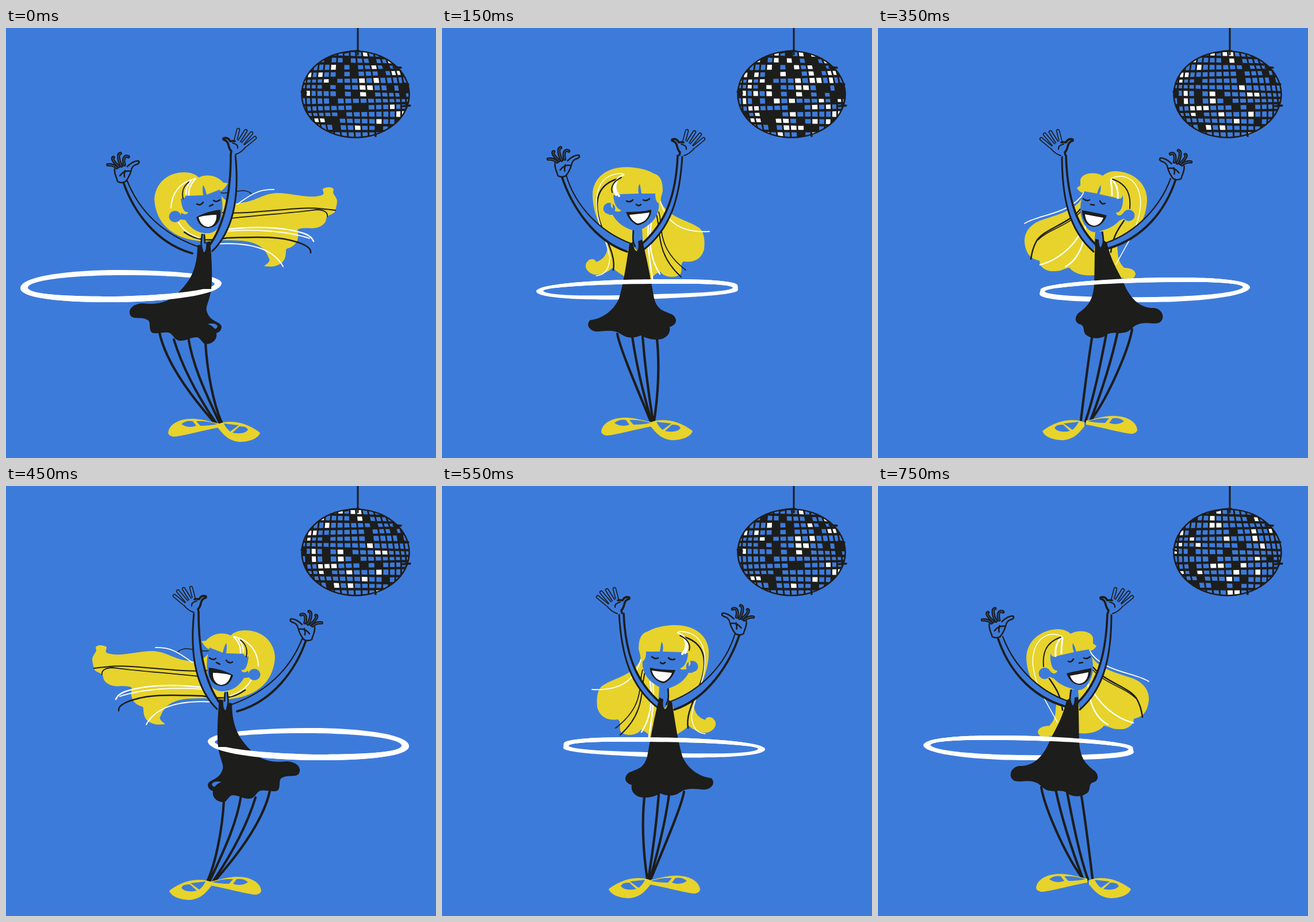
An HTML page that plays this animation: 748 by 748 pixels, repeating every 850 ms.

```html
<!DOCTYPE html>
<html lang="en">
<head>
<meta charset="utf-8">
<title>Hula hoop</title>
<style>
html, body { margin: 0; width: 100%; height: 100%; overflow: hidden; background: #3d7bdb; }
svg { display: block; width: 100vw; height: 100vh; }
path, ellipse { fill: none; stroke-linecap: round; stroke-linejoin: round; }
.k { stroke: #1d1d1b; }
.w { stroke: #fff; }
.b { stroke: #3d7bdb; }
.K { fill: #1d1d1b; }
.W { fill: #fff; }
.B { fill: #3d7bdb; }
.Y { fill: #e7d32b; }
.hoop { fill: #fff; fill-rule: evenodd; }
#girl, #girl > g, #ball > g { animation: 850ms step-end infinite; }
#girl { animation-name: flip; }
#girl > g, #ball > g { visibility: hidden; }
#girl > #far { animation-name: far; }
#girl > #mid { animation-name: mid; }
#girl > #near { animation-name: near; }
#ball > #tiles0 { animation-name: tiles0; }
#ball > #tiles1 { animation-name: tiles1; }
#ball > #tiles2 { animation-name: tiles2; }
#ball > #tiles3 { animation-name: tiles3; }
#ball > #grid { visibility: visible; animation: none; }
@keyframes flip {
  0%, 76.47% { transform: none; }
  29.41% { transform: translateX(726px) scaleX(-1); }
}
@keyframes far {
  0%, 52.94% { visibility: visible; }
  5.88%, 58.82% { visibility: hidden; }
}
@keyframes mid {
  0%, 17.64%, 52.94%, 64.7% { visibility: hidden; }
  5.88%, 41.17%, 58.82%, 88.23% { visibility: visible; }
}
@keyframes near {
  0%, 41.17%, 88.23% { visibility: hidden; }
  17.64%, 64.7% { visibility: visible; }
}
@keyframes tiles0 {
  0%, 64.7% { visibility: visible; }
  5.88%, 88.23% { visibility: hidden; }
}
@keyframes tiles1 {
  0%, 41.17% { visibility: hidden; }
  17.64% { visibility: visible; }
}
@keyframes tiles2 {
  0%, 64.7% { visibility: hidden; }
  41.17% { visibility: visible; }
}
@keyframes tiles3 {
  0%, 17.64% { visibility: hidden; }
  5.88%, 88.23% { visibility: visible; }
}
</style>
</head>
<body>
<svg viewBox="0 0 748 748">
  <defs>
    <clipPath id="disc"><ellipse cx="608" cy="115.500" rx="93.500" ry="75"/></clipPath>
    <clipPath id="top"><path d="M0 0H748V452H0Z"/></clipPath>
    <clipPath id="bottom"><path d="M0 454H748V748H0Z"/></clipPath>
  </defs>
  <g id="ball"></g>
  <g id="girl"></g>
</svg>
<script>
const path = (cls, d, width = 0) => `<path class="${cls}" d="${d}" stroke-width="${width}"/>`;
const at = ([x, y], art) => `<g transform="translate(${x} ${y})">${art}</g>`;
const strands = (cls, list) => list.map(([w, d]) => path(cls, d, w)).join('');
const finger = (d, outer, inner) => path('k', d, outer) + path('b', d, inner);

// Two cubic edges, each [x0,y0 ... x3,y3] from wrist to shoulder
function arm(outer, inner, wOuter, wInner) {
  const [a, b, c, d, e, f, g, h] = inner;
  const curve = p => `M${p.slice(0, 2)}C${p.slice(2)}`;
  return path('B', `${curve(outer)}L${g} ${h}C${e} ${f} ${c} ${d} ${a} ${b}Z`) +
    path('k', curve(outer), wOuter) + path('k', curve(inner), wInner);
}

const handL =
  path('B', 'M190 244L207 236L219 246L208 268L196 268Z') +
  ['M193 243Q186 237 177 238', 'M196 241C187 233 183 226 187 225',
   'M201 240C195 230 194 219 199 218', 'M206 238C203 228 206 220 213 224']
    .map(d => finger(d, 5.6, .9)).join('') +
  path('k B', 'M211 241Q221 231 230 231Q235 235 225 238Q219 241 218 247C216 255 212 262 208 267', 2.5) +
  path('k', 'M189 245C188 256 194 262 194 267Q201 271 208 267M198 257Q205 247 216 249M207 248Q205 254 206 259', 2.5);

const handR =
  ['M399 196L404 177', 'M405 198L417 179', 'M411 202L427 183', 'M415 206L433 191']
    .map(d => finger(d, 6.5, 3.2)).join('') +
  path('B', 'M389 197L401 194L419 207L409 217L398 222L391 218Z') +
  path('k', 'M378 192Q386 189 390 197Q395 196 398 197M378 194C390 197 385 209 392 214L391 219', 3.6) +
  path('k', 'M417 207Q409 217 399 220M394 200Q404 202 403 209', 2);

const shoeL = path('Y', 'M282 704C284 687 306 678 330 680C350 682 358 686 371 688L371 695C345 699 304 711 291 711Q282 709 282 704Z') +
  path('B', 'M305 689Q314 682 325 684L331 692Q316 697 305 689Z') +
  path('B', 'M331 684Q348 683 368 689Q354 692 338 692Z');
const shoeR = path('Y', 'M369 689C385 682 415 683 442 704C438 716 420 720 406 720C385 718 376 704 369 696Z') +
  path('B', 'M379 688L405 691L390 702Q383 697 379 688Z') +
  path('B', 'M394 704L406 693Q418 692 421 699Q414 708 394 704Z');

const poses = {
  far: {
    hair: 'M258 298C260 268 283 251 310 251C322 251 331 255 335 260C350 253 368 257 378 269L386 270C380 280 375 284 371 284C376 300 392 308 410 304C435 301 445 289 470 287C500 287 525 298 549 291C556 288 550 284 551 280C560 275 570 277 570 282C566 289 576 293 576 302C575 312 573 316 572 320C566 326 558 325 557 332C556 344 540 350 527 348C518 348 508 348 507 352C511 365 506 380 488 384C486 388 488 395 484 403C478 414 462 417 449 414C456 409 461 405 457 400C452 385 440 373 410 370C380 368 360 370 345 371C310 370 262 355 258 298Z',
    dark: [[2, 'M375 321C430 325 500 310 545 314Q565 316 573 317'], [1.8, 'M375 333C430 326 500 322 540 316C555 316 560 322 559 328'],
      [2.5, 'M310 355C330 369 350 372 385 365C430 364 470 361 505 372C525 378 531 384 530 391'],
      [1.4, 'M370 286C385 290 400 282 415 283Q425 285 427 289']],
    light: [[1.8, 'M402 307C425 290 440 280 466 281'], [2.5, 'M372 352C420 345 480 344 520 358Q532 363 535 371'],
      [1.8, 'M378 354C430 349 490 353 528 366'], [2, 'M350 377C400 372 460 375 482 415']],
    face: 'M304 297L310 296L313 292L343 291Q341 278 343 273Q347 280 349 290L372 281C376 295 379 312 374 335C371 350 362 357 350 357C332 357 320 347 312 334L303 333L305 321C312 327 316 323 317 320C309 322 306 312 304 297Z',
    ear: [294, 328],
    locks: [[2, 'M330 262C300 268 288 290 287 313M300 338C308 352 320 360 336 365'], [2.5, 'M329 263Q317 276 318 290M322 266Q313 276 313 289']],
    lockDark: 'M318 268C307 276 306 288 308 297',
    mouth: 'M331 329C345 321 358 318 373 316C375 328 370 348 350 348C340 347 334 340 331 329Z',
    teeth: 'M335 329C346 326 356 325 366 325C367 337 360 346 351 346C342 345 337 338 335 329Z',
    eyes: 'M332 306Q338 310 343 303M361 300Q366 304 372 299M354 310L360 307',
    neck: 'M341 358L346 358L348 388L344 391L339 382Z',
    neckLine: 'M341 359C340 370 338 377 342 388M345 360L346 374',
    armL: [[204, 268, 222, 320, 262, 375, 324, 392], [210, 264, 232, 320, 275, 360, 336, 381]],
    armR: [[399, 221, 406, 290, 398, 350, 359, 388], [391, 220, 391, 290, 380, 342, 354, 378]],
    dress: 'M333 378L338 377Q341 390 345 390Q349 386 348 373L355 371C358 400 360 440 356 460C352 480 346 486 350 495C356 512 374 510 375 520C374 530 366 530 366 531C368 541 360 550 347 550C342 549 339 540 333 538C322 537 315 544 303 544C293 544 290 531 283 530C275 528 262 533 254 530C248 525 252 515 248 509C238 501 225 508 217 501C210 490 222 479 238 479C262 482 285 477 300 460C320 440 333 420 333 378Z',
    gap: 'M351 515Q363 512 368 518Q367 524 363 523Q358 517 351 515Z',
    legs: 'M267 530C280 590 335 655 362 686M292 542C310 600 340 650 366 688M317 538C325 590 350 640 372 688M347 548C350 600 362 660 377 690',
    hoop: 'M25 452C27 429 130 420 205 421C290 422 370 428 375 443C377 462 300 476 180 477C90 477 24 469 25 452ZM38 452C40 464 110 467 190 467C290 465 362 455 363 445C358 434 280 430 205 430C120 430 38 438 38 452Z',
    front: 'bottom', hands: [[0, 0], [0, 0]], shoes: [[0, 0], [0, 0]],
  },
  mid: {
    hair: 'M258 300C258 268 285 250 312 249C325 249 332 254 335 257C350 249 371 252 374 264L374 274L380 278C376 286 370 287 366 287C378 315 405 322 435 332C465 340 475 360 470 380C465 400 455 402 445 405C445 415 435 424 420 423C408 424 400 417 393 417C385 428 365 432 350 430L300 435C290 438 280 438 278 428C280 418 290 418 298 417C310 405 308 395 310 380C290 370 260 345 258 300Z',
    dark: [[2.5, 'M374 315C395 342 440 350 451 372Q458 385 460 402'], [1.6, 'M372 318C395 345 430 350 448 369'], [2.5, 'M298 335C310 352 318 365 321 390']],
    light: [[1.5, 'M320 261C285 248 265 280 270 315C275 350 290 370 312 411'], [2.5, 'M366 330C362 365 375 402 400 415'],
      [2.5, 'M371 352C385 378 410 403 444 412'], [1.8, 'M367 285C390 325 445 323 471 340']],
    face: 'M300 291Q302 297 306 297L341 289Q337 281 339 273Q343 280 345 288L367 284C374 300 376 315 372 330C366 348 358 355 348 355C330 352 315 345 306 335L299 332L300 322C305 329 311 326 312 321C302 322 299 305 300 291Z',
    ear: [290, 326],
    locks: [[3, 'M319 263Q307 276 309 296M321 264Q319 278 319 291']],
    lockDark: 'M318 263C291 272 286 292 288 314',
    mouth: 'M328 326C342 322 356 320 371 317C371 330 366 345 350 346C340 345 332 338 328 326Z',
    teeth: 'M334 330C346 328 356 326 366 324C365 335 360 343 350 344C342 343 337 338 334 330Z',
    eyes: 'M331 305Q336 308 340 301M358 299Q363 302 369 297M350 308L356 307',
    neck: 'M334 354L348 354L350 378L338 385L332 378Z',
    neckLine: 'M336 355C334 366 332 374 338 383',
    armL: [[208, 263, 225, 315, 262, 365, 327, 384], [217, 262, 235, 310, 275, 355, 330, 374]],
    armR: [[406, 222, 406, 290, 396, 350, 351, 389], [399, 222, 397, 285, 385, 340, 348, 376]],
    dress: 'M328 373L334 369Q335 382 338 383Q342 380 342 368L348 367C350 400 349 440 351 455C354 475 362 484 375 494C384 500 385 512 376 515C366 517 370 525 366 532C358 541 338 543 328 533C315 527 310 533 300 530C288 530 285 520 275 516C262 510 250 516 238 513C226 508 229 490 245 487C262 488 285 480 300 440C312 418 322 400 328 373Z',
    legs: 'M284 524C290 560 325 640 354 680M309 528C320 580 340 640 356 682M329 533C340 590 350 640 365 684M353 533C362 590 368 640 373 682',
    hoop: 'M79 451C82 438 140 434 210 434C310 434 435 444 443 454L445 463C443 477 330 477 250 477C150 476 79 464 79 451ZM91 451C100 461 170 467 250 468C330 469 434 467 436 458C432 450 310 442 210 442C140 441 92 444 91 451Z',
    front: 'top', hands: [[4.5, -5], [9, 2]], shoes: [[-7, -5], [-2, -3]],
  },
  near: {
    hair: 'M262 290C262 262 285 242 320 242C345 242 362 249 368 253C380 256 384 266 384 284C382 292 379 297 382 305C395 330 430 335 448 348C458 358 457 375 456 385C450 405 435 408 420 406C412 412 421 422 413 430C400 436 385 432 380 424C370 427 365 434 364 438L318 433C309 426 303 424 297 417C288 425 278 430 265 429C250 425 246 412 254 405C259 400 267 402 268 407C279 404 288 394 288 380C285 360 262 330 262 290Z',
    dark: [[1.8, 'M377 320C385 340 370 380 424 421'], [2, 'M372 322C382 345 368 390 416 433'], [2.5, 'M310 261C274 270 263 295 274 335C283 365 303 395 298 421']],
    light: [[1.5, 'M314 253C285 253 270 270 269 300C268 340 285 360 292 400Q290 430 268 431'], [2.5, 'M364 340C358 380 366 408 379 428'],
      [2.5, 'M359 342C356 375 362 410 366 436'], [1.8, 'M380 302C390 335 412 357 465 354']],
    face: 'M298 291L312 289L342 288Q340 276 344 271Q346 280 347 288L371 288C371 298 373 303 377 305C379 322 368 336 361 341C352 349 344 352 335 353C318 348 304 339 297 325L290 325L296 316C304 321 310 320 312 317C304 315 299 305 298 291Z',
    ear: [291, 314],
    curl: 'M297 301Q290 309 297 314',
    locks: [[4, 'M304 266Q297 279 308 292'], [3, 'M316 255Q300 262 299 278Q300 286 303 291']],
    lockDark: 'M312 260C299 266 293 276 296 286',
    mouth: 'M320 320C335 320 352 319 364 316C365 330 352 342 340 343C332 340 324 332 320 320Z',
    teeth: 'M326 325C340 324 352 322 361 321C358 333 350 339 340 340C333 337 328 331 326 325Z',
    eyes: 'M321 301Q327 304 332 299M350 299Q355 302 361 297M338 307Q342 311 346 307',
    neck: 'M331 351L348 350L350 380L340 388L331 378Z',
    neckLine: 'M333 353C332 364 331 371 336 380',
    armL: [[208, 257, 225, 310, 265, 370, 322, 389], [216, 256, 232, 310, 275, 355, 329, 375]],
    armR: [[418, 222, 414, 295, 398, 350, 349, 387], [410, 222, 407, 290, 390, 340, 345, 378]],
    dress: 'M326 376L332 372Q334 388 339 388Q343 384 341 371L348 368C355 395 362 430 368 465C372 490 385 492 400 498C410 505 410 516 396 520C398 530 392 538 382 541C365 545 352 537 345 535C335 540 322 540 312 533C300 524 285 527 270 528C255 527 250 515 258 508C280 506 300 490 308 470C316 445 322 400 326 376Z',
    legs: 'M305 532C310 560 345 640 362 682M331 537C340 600 355 650 364 684M349 537C354 600 360 640 367 684M374 541C380 600 374 650 369 684',
    hoop: 'M164 458C164 444 290 436 405 437C470 437 510 441 514 447L515 456C512 464 440 468 372 471C300 474 165 474 164 458ZM176 457C182 468 290 466 372 463C450 461 502 458 506 452C506 446 450 444 400 445C290 444 180 450 176 457Z',
    front: 'top', hands: [[7.5, -10], [22, 2]], shoes: [[-5, -2], [-6, -3]],
  },
};

const drawPose = ([id, p]) => `<g id="${id}">` +
  path('Y', p.hair) + strands('k', p.dark) + strands('w', p.light) +
  path('B', p.face) + `<ellipse class="B" cx="${p.ear[0]}" cy="${p.ear[1]}" rx="10.500" ry="10"/>` +
  (p.curl ? path('Y', p.curl) : '') +
  strands('w', p.locks) + path('k', p.lockDark, 2) +
  path('K', p.mouth) + path('W', p.teeth) + path('k', p.eyes, 2.6) +
  path('B', p.neck) +
  arm(...p.armL, 3.8, 2.2) + arm(...p.armR, 3, 3.6) +
  path('k', p.neckLine, 2.6) +
  at(p.hands[0], handL) + at(p.hands[1], handR) +
  path('k', p.legs, 4.2) + at(p.shoes[0], shoeL) + at(p.shoes[1], shoeR) +
  path('hoop', p.hoop) + path('K', p.dress) + (p.gap ? path('B', p.gap) : '') +
  `<g clip-path="url(#${p.front})">${path('hoop', p.hoop)}</g></g>`;

// Mirror ball: nearly square mesh, a little bent, tiles lit at random
const COLS = 17, ROWS = 13;
function spot(c, r) {
  const s = c / COLS * 2 - 1, v = r / ROWS * 2 - 1;
  const u = 1.2 * s - .2 * s ** 3;
  const x = 608 + 94 * u * (1 - .16 * v * v) + 5 * v * (1 + u);
  const y = 115 + 76 * v + 2.5 * u * Math.sin(r * 1.3);
  return [x.toFixed(1), y.toFixed(1)];
}
const noise = (c, r, seed) => {
  const n = Math.sin(c * 12.99 + r * 78.23 + seed * 37.7) * 43758.5;
  return n - Math.floor(n);
};
function tiles(seed, white, black) {
  let lit = '', off = '';
  for (let r = 0; r < ROWS; r++) for (let c = 0; c < COLS; c++) {
    const n = noise(c, r, seed);
    const d = `M${spot(c, r)}L${spot(c + 1, r)}L${spot(c + 1, r + 1)}L${spot(c, r + 1)}Z`;
    if (n < white) lit += d;
    else if (n > 1 - black) off += d;
  }
  return path('W', lit) + path('K', off);
}
const line = (n, f) => 'M' + Array.from({ length: n + 1 }, (_, i) => f(i)).join('L');
let cols = '', rows = '';
for (let c = 1; c < COLS; c++) cols += line(ROWS, r => spot(c, r));
for (let r = 1; r < ROWS; r++) rows += line(COLS, c => spot(c, r));
const looks = [[1, .14, .15], [1, .32, .32], [2, .12, .11], [3, .13, .12]];

document.getElementById('ball').innerHTML =
  looks.map((l, i) => `<g id="tiles${i}" clip-path="url(#disc)">${tiles(...l)}</g>`).join('') +
  `<g id="grid" clip-path="url(#disc)">${path('k', cols, 3) + path('k', rows, 4.2)}</g>` +
  '<ellipse class="k" cx="608" cy="115.500" rx="93.500" ry="75" stroke-width="2.6"/>' +
  path('k', 'M612 -4V46M590 43Q602 39 615 40', 3) +
  path('k', 'M674 68L687 69M690 96L700 98M690 136L703 135M514 111L522 113M642 180L643 188', 3.4);
document.getElementById('girl').innerHTML = Object.entries(poses).map(drawPose).join('');
</script>
</body>
</html>
```
